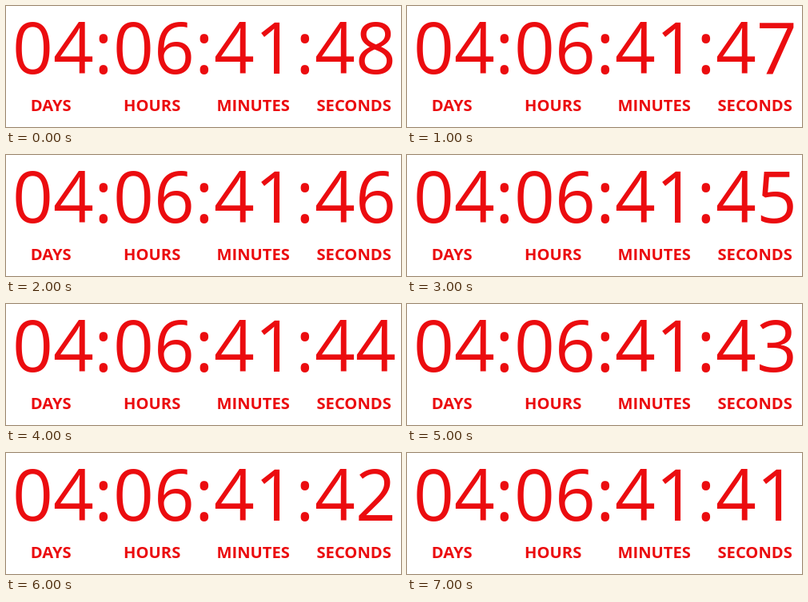
An HTML page that plays this animation: 494 by 152 pixels, repeating every 8 s.

```html
<!DOCTYPE html>
<html lang="en">
<head>
<meta charset="utf-8">
<title>Countdown</title>
<style>
  html, body { margin: 0; width: 100%; height: 100%; overflow: hidden; background: #fff; }
  svg { display: block; }
  text { font-family: "Open Sans", sans-serif; fill: #eb0c0f; }
  .clock { font-size: 89px; }
  .label { font-size: 20.2px; font-weight: 700; text-anchor: middle; }
</style>
</head>
<body>
<svg width="494" height="152" viewBox="0 0 494 152">
  <text class="clock" y="85"></text>
  <text class="label" x="56.2" y="132">DAYS</text>
  <text class="label" x="182.7" y="132">HOURS</text>
  <text class="label" x="309.2" y="132">MINUTES</text>
  <text class="label" x="435.2" y="132">SECONDS</text>
</svg>
<script>
  const LOOP = 8000, FIRST = 48;
  const DIGIT = 51, COLON = 24, LEFT = 8;
  const clock = document.querySelector('.clock');
  const start = performance.now();
  let shown;

  // Each character sits on a whole pixel.
  let x = LEFT;
  clock.setAttribute('x', [...'00:00:00:00'].map(c => {
    const at = x;
    x += c === ':' ? COLON : DIGIT;
    return at;
  }).join(' '));

  function draw(now) {
    const t = Math.max(0, now - start) % LOOP;
    const seconds = FIRST - Math.floor(t / 1000);
    if (seconds !== shown) {
      shown = seconds;
      clock.textContent = '04:06:41:' + seconds;
    }
    requestAnimationFrame(draw);
  }
  draw(start);
</script>
</body>
</html>
```
